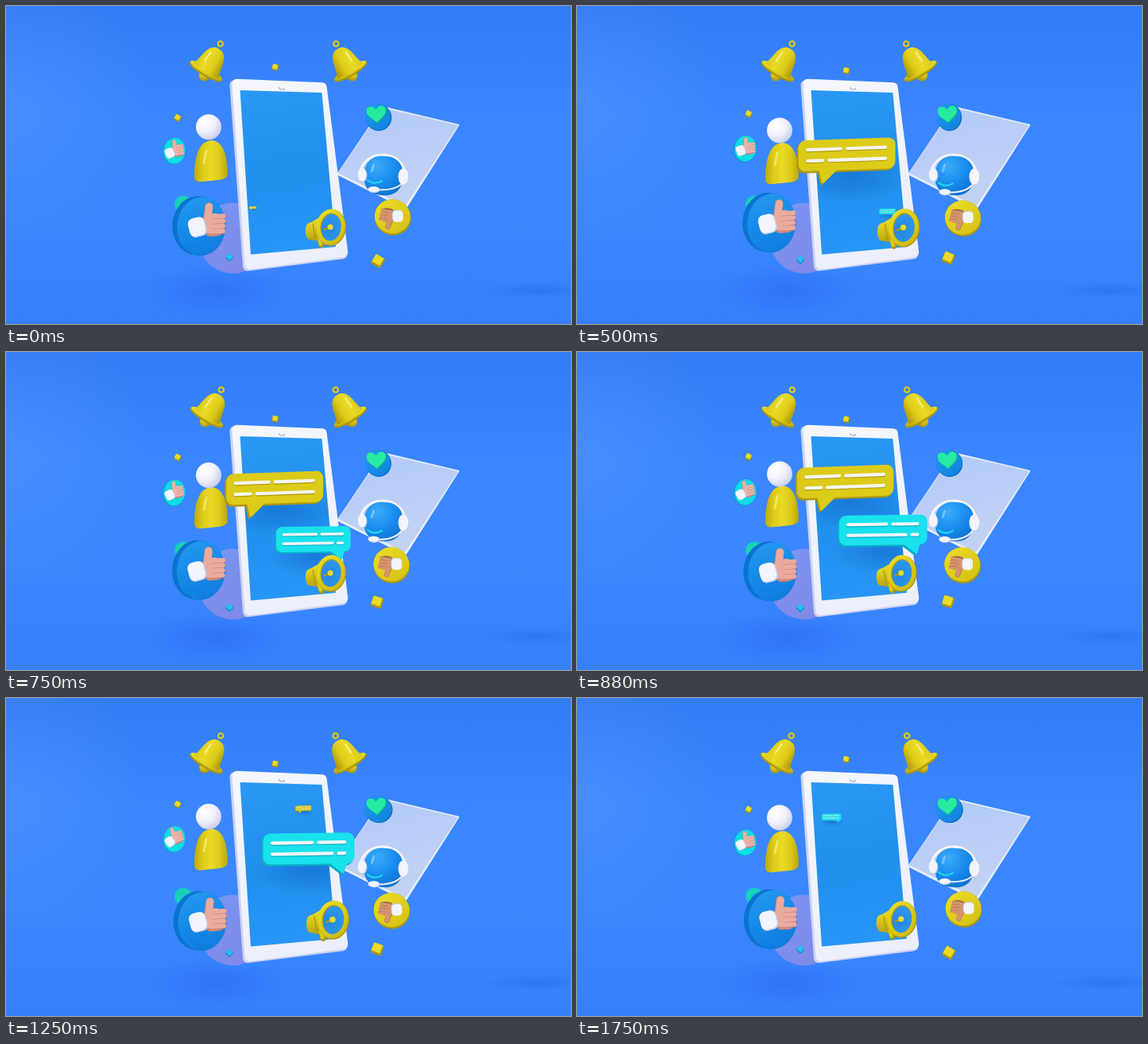
Animation, 711 px wide and 400 px high, one loop 1.87 s. Source, as an HTML page with a canvas:

```html
<!DOCTYPE html>
<html lang="en">
<head>
<meta charset="utf-8">
<title>Chat on a phone</title>
<style>
html, body { margin: 0; width: 100%; height: 100%; overflow: hidden; background: #3a86ff; }
canvas { display: block; width: 100vw; height: 100vh; }
</style>
</head>
<body>
<canvas id="stage" width="711" height="400"></canvas>
<script>
const ctx = document.getElementById('stage').getContext('2d');
const LOOP = 1870, STEPS = 15, TAU = Math.PI * 2;
const WHITE = '#f3f4fd', SHADE = '#c2cbe9', YELLOW = '#dccb18', GOLD = '#eadb26', OCHRE = '#ae980a';
const SCREEN = [[294.5, 106], [397.5, 109], [415, 303], [308, 312.5]];
let step = 0;

const wave = (peak, amp, cycles = 1) => amp * Math.cos(TAU * cycles * (step - peak) / STEPS);

function easeOut(p) {
  const t = Math.min(1, Math.max(0, p));
  return 1 - (1 - t) ** 2;
}

function addStops(gradient, colors) {
  colors.forEach((c, i) => gradient.addColorStop(i / (colors.length - 1), c));
  return gradient;
}
const linear = (x0, y0, x1, y1, ...colors) => addStops(ctx.createLinearGradient(x0, y0, x1, y1), colors);
const radial = (x, y, r, ...colors) => addStops(ctx.createRadialGradient(x, y, 0, x, y, r), colors);

function at(x, y, draw, { scale = 1, flip = 1, angle = 0, slope = 0 } = {}) {
  ctx.save();
  ctx.translate(x, y);
  ctx.rotate(angle);
  ctx.transform(scale * flip, scale * slope, 0, scale, 0, 0);
  draw();
  ctx.restore();
}

function poly(points, fill, radius = 0) {
  const [ax, ay] = points[0], [bx, by] = points[points.length - 1];
  ctx.beginPath();
  ctx.moveTo((ax + bx) / 2, (ay + by) / 2);
  points.forEach(([x, y], i) => ctx.arcTo(x, y, ...points[(i + 1) % points.length], radius));
  ctx.closePath();
  ctx.fillStyle = fill;
  ctx.fill();
}

function box(x, y, w, h, radius, fill) {
  ctx.beginPath();
  ctx.roundRect(x, y, w, h, radius);
  ctx.fillStyle = fill;
  ctx.fill();
}

function oval(x, y, rx, ry, fill, angle = 0) {
  ctx.beginPath();
  ctx.ellipse(x, y, rx, ry, angle, 0, TAU);
  ctx.fillStyle = fill;
  ctx.fill();
}

function ring(x, y, rx, ry, color, width, angle = 0, from = 0, to = TAU) {
  ctx.beginPath();
  ctx.ellipse(x, y, rx, ry, angle, from, to);
  ctx.strokeStyle = color;
  ctx.lineWidth = width;
  ctx.stroke();
}

function trace(path, color, width) {
  ctx.strokeStyle = color;
  ctx.lineWidth = width;
  ctx.stroke(new Path2D(path));
}

const line = (x0, y0, x1, y1, color, width) => trace(`M${x0} ${y0}L${x1} ${y1}`, color, width);

function shape(path, fill) {
  ctx.fillStyle = fill;
  ctx.fill(new Path2D(path));
}

function glow(x, y, rx, ry, rgb, alpha) {
  ctx.save();
  ctx.translate(x, y);
  ctx.scale(1, ry / rx);
  oval(0, 0, rx, rx, radial(0, 0, rx, `rgba(${rgb},${alpha})`, `rgba(${rgb},0)`));
  ctx.restore();
}

function background() {
  ctx.fillStyle = linear(0, 0, 0, 400, '#337cf6', '#3a86ff', '#3a87ff', '#3680fd');
  ctx.fillRect(0, 0, 711, 400);
  glow(0, 120, 180, 180, '95,155,255', .35);
  glow(265, 358, 95, 32, '38,95,240', .4);
  glow(670, 358, 75, 10, '30,95,225', .35);
}

function paper() {
  poly([[474, 126], [571, 149], [503, 256], [416, 212]], '#e6edfd', 1);
  poly([[474, 128], [569, 150], [502, 252], [418, 210]], linear(470, 130, 500, 250, '#b3cbfa', '#c3d2f3'), 1);
}

function bell(x, y, flip) {
  at(x, y, () => {
    ring(18, -34, 3.2, 3.2, YELLOW, 2.2);
    oval(-2, 6, 7, 7, radial(-4, 4, 9, GOLD, OCHRE));
    at(0, 0, () => {
      oval(0, 1, 23.5, 6, OCHRE);
      oval(0, -.5, 23, 5, linear(-22, 0, 22, 0, GOLD, YELLOW, '#c5b00c'));
      shape('M-19 0 C-13 -7 -17 -32 0 -32 C17 -32 13 -7 19 0 Q0 5 -19 0Z', linear(-17, 0, 17, 0, YELLOW, GOLD, YELLOW, OCHRE));
      line(-7, -23, -8, -10, 'rgba(255,250,190,.7)', 2);
    }, { angle: .53 });
  }, { flip });
}

function cube(x, y, size, angle, light = GOLD, dark = OCHRE) {
  at(x, y, () => {
    box(-size / 2, -size / 2, size, size, 1, dark);
    box(-size / 2, -size / 2, size * .85, size * .8, 1, light);
  }, { angle });
}

function person() {
  at(258, 169.2 + wave(3.3, 4), () => {
    shape('M-21 46 C-21 20 -16 0 1 -1 C16 0 21 20 21 42 Q20 48 8 49 L-12 51 Q-20 52 -21 46Z',
      linear(-21, 0, 21, 0, '#c0aa0a', YELLOW, GOLD, YELLOW, '#bda70b'));
    line(-6, 12, -9, 27, 'rgba(255,248,160,.55)', 3);
  });
  at(255, 152.4 + wave(3.9, 4), () => oval(0, 0, 16, 16, radial(-5, -6, 26, '#ffffff', '#f0f0fb', '#bdc4e6')));
}

function hand(skin, shadow) {
  line(7, -10, 9, -25, shadow, 10.5);
  line(7.5, -10, 9.2, -25.3, skin, 9);
  at(14, -2, () => {
    box(-11, -14, 23, 28, 7, shadow);
    box(-11, -14.5, 22, 25, 7, skin);
    for (let y = -10.5; y < 12; y += 6.2) {
      line(1, y + .8, 13 - y * .1, y + .8, shadow, 6);
      line(-1, y, 13 - y * .1, y, skin, 5.4);
    }
  }, { angle: -.08 });
  at(-6, 0, () => {
    box(-10.5, -11, 22, 24, 7, SHADE);
    box(-10.5, -11.5, 20.5, 23, 7, WHITE);
  }, { angle: -.25 });
}

function disc(x, y, rx, ry, face, side, dx, dy, angle = 0) {
  for (let i = 0; i <= 4; i++) oval(x + dx * i / 4, y + dy * i / 4, rx, ry, side, angle);
  oval(x, y, rx, ry, face, angle);
}

function reactions() {
  oval(223, 249.5, 11, 11, '#16c8d0');
  ring(223, 249.5, 7, 7, '#1cd99c', 3);

  const big = 277.2 - wave(3.7, 4.2), shift = wave(3.5, 1.2);
  disc(246 - shift, big, 30.5, 37, linear(226, big - 35, 256, big + 37, '#2399f0', '#168ae9', '#0f7cdc'), '#0b73cf', -6, -1, .08);
  at(246.5 - shift, big + .5, () => hand('#eaab9f', '#cd887d'));

  const small = 179.2 + wave(.3, 3.1);
  disc(212, small, 13.5, 16.2, '#0bdfe2', '#149bd8', -1.5, 1, .12);
  at(209, small + 2, () => hand('#ecb3a8', '#bf8583'), { scale: .52, angle: -.22 - wave(10, .15) });

  const down = 266 - wave(0, 1.3), x = 485.6 + wave(0, .8);
  disc(x, down, 22.5, 21.5, linear(x - 15, down - 20, x + 15, down + 20, GOLD, '#d6c213'), OCHRE, .6, 2.2, .15);
  at(x + 3, down - 1, () => hand('#d5946f', '#a56b48'), { scale: .62, angle: Math.PI + .22 });
}

function heart() {
  const path = 'M0 11 C-5 6 -13 2 -12 -5 C-11 -11 -3 -11 0 -5 C3 -11 11 -11 12 -5 C13 2 5 6 0 11Z';
  disc(468, 139.6, 16.2 - wave(3.5, 1.2), 16.5, linear(455, 125, 480, 156, '#2099f0', '#1082de'), '#0b6ec4', 1.2, 1, .1);
  at(466.8, 136.4, () => shape(path, '#12b981'), { angle: -.08 });
  at(466, 135.5, () => shape(path, '#27eba0'), { angle: -.08 });
}

function earCup(x, y, rx, ry) {
  oval(x + .8, y + 1, rx + .5, ry + .5, SHADE);
  oval(x, y, rx, ry, WHITE);
}

function agent() {
  const mic = 233.4 + wave(7, 2.5);
  [[SHADE, 4.5], [WHITE, 3.2]].forEach(([color, width]) =>
    ring(474, 211.5, 28, 24.5, color, width, 0, Math.PI * 1.02, Math.PI * 1.98));
  at(475, 213.5, () => {
    box(-24, -24.5, 48, 49, 20, radial(-8, -12, 42, '#3aabf8', '#1b8ef0', '#0c6fcc'));
    line(-13, -13, -15, -5, 'rgba(180,225,255,.5)', 3);
  }, { angle: .05 });
  trace(`M455 ${mic - 12}Q463 ${mic - 5} 473 ${mic - 11}`, '#1fd7ee', 2.2);
  earCup(448, 212, 5.2, 8.5);
  trace(`M500 221Q492 ${mic + 2} 464 ${mic}`, '#eef0fb', 2);
  earCup(500, 214.5, 6.4, 10.2);
  earCup(462.6, mic - .6, 7, 3.4);
}

function phone() {
  poly([[281, 93], [402, 97], [430, 317.5], [298.5, 334]], '#cbd4f4', 6);
  poly([[284, 91.5], [403, 96.5], [431, 315], [301, 332]], linear(290, 92, 420, 330, '#f6f7fe', '#ebeefc'), 6);
  poly(SCREEN, linear(330, 107, 365, 310, '#2a97f4', '#218fee', '#2896f6'), 1);
  ring(347, 103, 3.4, 2, '#a9b2cd', 1.2, .1, 0, Math.PI);
}

// Grows out of one point, drifts up at an even pace and shrinks into another.
function bubble(b) {
  const grow = easeOut((step - b.start) / b.growth), shrink = easeOut((b.end - step) / 3.5);
  const scale = grow * shrink;
  if (scale <= 0) return;
  const [x, y] = [0, 1].map(i =>
    b.origin[i] + b.drift[i] * (step - b.start) + b.from[i] * (1 - grow) + b.to[i] * (1 - shrink));

  ctx.save();
  ctx.beginPath();
  SCREEN.forEach(p => ctx.lineTo(...p));
  ctx.clip();
  glow(x + 5 * scale, y + 26 * scale, 72 * scale, 32 * scale, '10,85,180', .4);
  ctx.restore();

  const half = b.width / 2, [tipX, tipY] = b.tip, lean = -Math.sign(tipX);
  const layer = (dx, dy, color) => at(dx, dy, () => {
    poly([[tipX - 5 * lean, 14], [tipX, tipY], [tipX + 22 * lean, 14]], color, 1.5);
    box(-half, -21, b.width, 39, 9, color);
  });
  at(x, y, () => {
    layer(-1.5, 1.8, b.side);
    layer(-.5, .8, b.side);
    layer(.5, -.5, b.face);
    b.gaps.forEach((gap, row) => {
      const rowY = row * 14 - 9.5;
      [[1.2, b.side], [0, '#f4f5f8']].forEach(([dy, color]) => {
        line(12 - half, rowY + dy, gap - 4, rowY + dy, color, 4.2);
        line(gap + 4, rowY + dy, half - 12, rowY + dy, color, 4.2);
      });
    });
  }, { scale, slope: b.slope });
}

const question = {
  start: -.08, growth: 2.1, end: 10.3, origin: [342, 221], drift: [-.7, -7.9], from: [-34, 36], to: [47, -3],
  width: 122, slope: -.035, tip: [-31, 35], gaps: [-3, -26], face: YELLOW, side: OCHRE
};
const answer = {
  start: 3.6, growth: 4.2, end: 14.4, origin: [389.5, 265], drift: [-1.4, -11.5], from: [2, -2], to: [-70, 6],
  width: 115, slope: -.015, tip: [44, 31], gaps: [9, 34], face: '#1ae2ec', side: '#0cacc9'
};

function megaphone() {
  const swing = wave(3, 1, 2);
  at(410 + swing * 1.7, 278.3 + swing * .4, () => {
    shape('M-32 0 Q-31 -5 -25 -6 L-8 -16 L-3 19 L-16 18 L-29 16 Q-34 10 -32 0Z', linear(-20, -10, -12, 20, GOLD, OCHRE));
    line(-14, 16, -12, 23, OCHRE, 7);
    line(-15, 15, -13, 22, YELLOW, 4.5);
    line(-23, -4, -20, 14, OCHRE, 1.3);
    oval(0, 0, 15, 19, radial(-3, 3, 20, '#2586dc', '#2d97f2'), .12);
    line(-8, 3, -1, 1, OCHRE, 2.5);
    oval(-.5, 0, 3.6, 3.6, GOLD);
    ring(.7, .8, 16, 20.5, OCHRE, 6.2, .12);
    ring(0, 0, 16, 20.5, linear(-14, -18, 14, 18, GOLD, YELLOW, '#cfba0f'), 5.2, .12);
  }, { scale: 1 + swing * .03 });
}

function draw() {
  ctx.lineCap = ctx.lineJoin = 'round';
  background();
  paper();
  oval(286, 292, 44, 44.5, linear(245, 250, 300, 335, '#7a95f4', '#8089e6'));
  bell(252.3 + wave(6, .6), 81.5, 1);
  bell(432.8 - wave(4, .6, 2), 81.5, -1);
  cube(339, 81 + wave(7.5, 4), 7.5, .2);
  cube(216, 136.3 + wave(0, 4.5), 7.5, .5);
  cube(467.6 + wave(0, .6), 317.5 + wave(0, 3.4), 13.5, .42 + wave(0, .12));
  person();
  reactions();
  phone();
  cube(281, 319.2 + wave(7.5, 3), 8, .75, '#25bff2', '#1689d5');
  heart();
  agent();
  bubble(question);
  bubble(answer);
  megaphone();
}

function tick(now) {
  const time = now % LOOP;
  step = 0;
  while (step < STEPS - 1 && Math.round((step + 1) * 12.5) * 10 <= time) step++;
  draw();
  requestAnimationFrame(tick);
}

requestAnimationFrame(tick);
</script>
</body>
</html>
```
